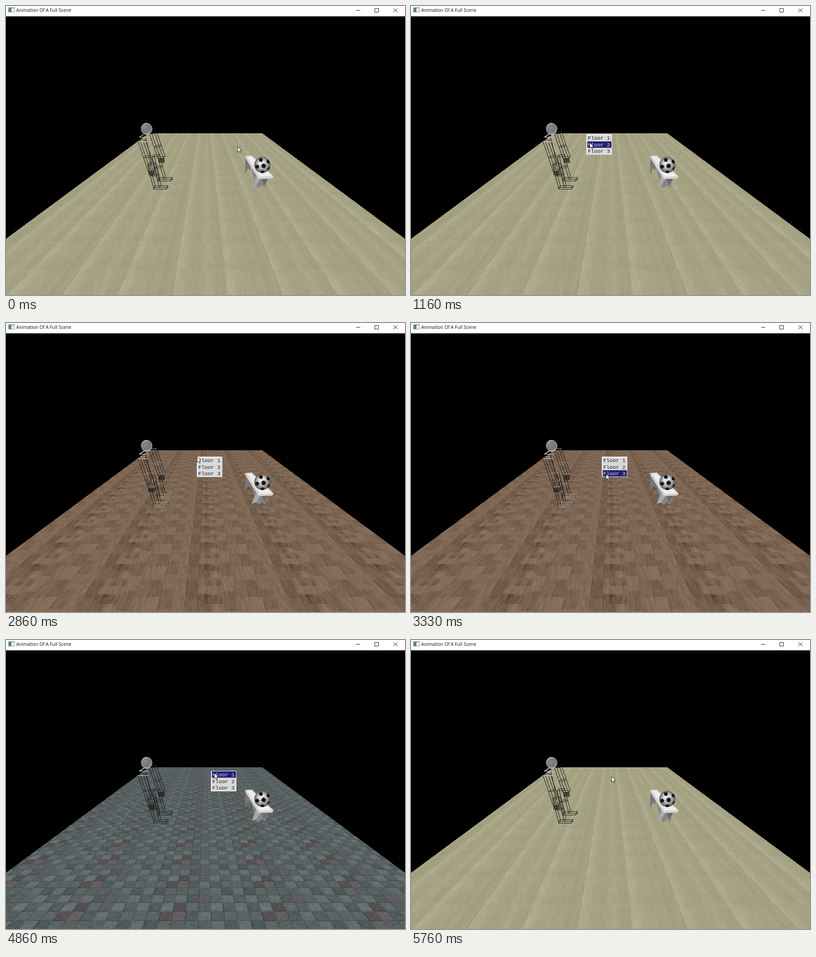
These frames come from a looping animation (878x638 px, 5.9 s). An HTML page with a canvas:

```html
<!DOCTYPE html>
<html lang="en">
<head>
<meta charset="utf-8">
<title>Animation Of A Full Scene</title>
<style>
html, body { margin: 0; width: 100%; height: 100%; overflow: hidden; background: #000; }
canvas { display: block; }
</style>
</head>
<body>
<canvas id="stage" width="878" height="638"></canvas>
<script>
const W = 878, H = 638, LOOP = 5900;
const stage = document.getElementById('stage').getContext('2d');

// ---- floor textures: a runs across, b runs along the depth ----
const frac = v => v - Math.floor(v);
const rnd = (i, j = 0) => frac(Math.sin(i * 127.1 + j * 311.7 + 17) * 43758.5453);
function noise(x, y) {
  const i = Math.floor(x), j = Math.floor(y), s = v => v * v * (3 - 2 * v);
  const p = s(x - i), q = s(y - j);
  const top = rnd(i, j) * (1 - p) + rnd(i + 1, j) * p;
  const low = rnd(i, j + 1) * (1 - p) + rnd(i + 1, j + 1) * p;
  return top * (1 - q) + low * q;
}

function planks(a, b) {
  a = frac(a - .15);
  const e = frac(a * 2), edge = Math.exp(-e * 5);
  const l = 154 + 8 * noise(a * 70, b * 5) + 12 * noise(a * 9 + 40, b * 1.6 + 3)
    + 11 * edge - (a < .5 ? 0 : 3) - 5 * noise(a * 25, b * 2 + 9);
  return [l + 3, l, l - 32 + 8 * edge];
}

function parquet(a, b) {
  const col = Math.floor(a * 8), c = (b * 2 + rnd(col, 5) * 2) % 2, row = Math.floor(c);
  let l = (rnd(col, row) - .5) * 28 + (noise(a * 90, b * 6) - .5) * 20;
  if (frac(a * 8) < .05 || frac(c) < .03) l -= 9;
  const mosaic = Math.abs(a - .52) < .09 && frac(b * 2) < .5;
  if (mosaic) l -= 6 + 22 * rnd(Math.floor(a * 32), Math.floor(b * 6));
  return [125 + l, 103 + l * .95, 84 + l * .85];
}

function stones(a, b) {
  const x = a * 8, y = b * 4, i = Math.floor(x), j = Math.floor(y);
  let l = (rnd(i, j) - .5) * 16 + ((i + j) % 2 ? 6 : -6) + (noise(a * 60, b * 30) - .5) * 16;
  if (frac(x) < .07 || frac(y) < .1) l -= 14;
  const red = rnd(i, j + 20) > .92 ? 7 : 0;
  return [90 + l + red, 100 + l - red, 101 + l - red];
}

// ---- perspective floor, painted pixel by pixel ----
const VX = 439, VY = 188.3, SLOPE = 1.348, TOP = 281, N = 256;
function paintFloor(g, shade) {
  const tex = new Float32Array(N * N * 3);
  for (let j = 0, k = 0; j < N; j++)
    for (let i = 0; i < N; i++)
      for (const c of shade(i / N, j / N)) tex[k++] = c;
  const img = g.createImageData(W, H - TOP);
  for (let y = TOP; y < H; y++) {
    for (let x = 0; x < W; x++) {
      if (Math.abs(x + .5 - VX) > SLOPE * (y + .5 - VY)) continue;
      const sum = [0, 0, 0];
      for (let s = 0; s < 8; s++) {
        const dy = y + (s % 4 + .5) / 4 - VY, dx = x + (s < 4 ? .25 : .75) - VX;
        const i = Math.floor(frac(dx / (SLOPE * dy * .4) + .45) * N);
        const j = Math.floor(frac((1 / dy - .00255) / .00047) * N);
        for (let c = 0; c < 3; c++) sum[c] += tex[(j * N + i) * 3 + c];
      }
      const o = ((y - TOP) * W + x) * 4;
      for (let c = 0; c < 3; c++) img.data[o + c] = sum[c] / 8;
      img.data[o + 3] = 255;
    }
  }
  g.putImageData(img, 0, TOP);
}

// ---- drawing helpers ----
function path(g, pts, close) {
  g.beginPath();
  for (let i = 0; i < pts.length; i += 2) g.lineTo(pts[i], pts[i + 1]);
  if (close) g.closePath();
}
function poly(g, fill, ...pts) { path(g, pts, true); g.fillStyle = fill; g.fill(); }
function line(g, color, ...pts) {
  path(g, pts.map(p => Math.round(p) + .5));
  g.strokeStyle = color; g.lineWidth = 1; g.stroke();
}
function rect(g, fill, x, y, w, h) { g.fillStyle = fill; g.fillRect(x, y, w, h); }
function disc(g, fill, r) { g.fillStyle = fill; g.beginPath(); g.arc(0, 0, r, 0, 7); g.fill(); }
function glow(g, r, dy, ...colors) {
  const grad = g.createRadialGradient(-2, dy, 1, 0, 0, r);
  colors.forEach((c, i) => grad.addColorStop(i / (colors.length - 1), c));
  return grad;
}

// Wire box leaning from (x, y) to (u, v), w wide, with its back face up and right.
function limb(g, rung, [x, y], [u, v], w) {
  for (const [p, q] of [[x, y], [u, v]])
    line(g, rung, p, q, p + w, q, p + w + 4, q - 4, p + 4, q - 4, p, q);
  for (const p of [0, w]) {
    line(g, '#111', x + p, y, u + p, v);
    line(g, '#111', x + p + 4, y - 4, u + p + 4, v - 4);
  }
}

function paintHand(g, [x, y]) {
  for (let i = 0; i < 5; i++) {
    line(g, '#0b0b0b', x + 1 + i * 3, y - 1 + i % 2, x + 2 + i * 3, y + 9 + i % 3);
    line(g, '#222', x + 1, y + i * 2, x + 14, y + i * 2 + 1);
  }
}

// One arm and one leg, then the same again further back.
function paintFigure(g, rung) {
  const arm = [[290, 299], [302, 334], [312, 364]];
  const leg = [[311, 350], [317, 375], [324, 400]];
  const farArm = arm.map(([x, y]) => [315 + (x - 290) * .85, 281 + (y - 299) * .85]);
  const farLeg = leg.map(([x, y]) => [x + 10, y - 18]);
  for (const [a, l] of [[farArm, farLeg], [arm, leg]]) {
    for (let i = 0; i < 2; i++) {
      limb(g, rung, a[i], a[i + 1], 12);
      limb(g, rung, l[i], l[i + 1], 13);
    }
    const [x, y] = l[2];
    limb(g, rung, [x, y], [x, y + 4], 28);
    paintHand(g, a[2]);
  }
  line(g, '#111', 306, 284, 320, 347);
  line(g, '#e4e4e4', 290, 299, 313, 299);
  line(g, '#ddd', 312, 289, 293, 289, 304, 282, 314, 282);

  g.save();
  g.translate(309.5, 271);
  g.rotate(-.35);
  const r = 12.2;
  disc(g, glow(g, r, -3, '#6a6a6a', '#3c3c3c'), r);
  g.strokeStyle = 'rgba(205,205,205,.6)';
  g.lineWidth = .5;
  for (let k = -5; k <= 5; k++) {
    const w = r * Math.cos(k * .28);
    g.beginPath(); g.ellipse(0, 0, w, r, 0, 0, 7); g.stroke();
    g.beginPath(); g.ellipse(0, r * Math.sin(k * .28), w, w * .2, 0, 0, 7); g.stroke();
  }
  g.restore();
}

function paintTable(g) {
  poly(g, '#777', 527, 334, 540, 346, 537, 364, 533, 358, 526, 371);
  poly(g, '#858585', 540, 358, 577, 380, 570, 401, 563, 395, 556, 402, 549, 396, 541, 399, 546, 384);
  poly(g, '#a8a8a8', 552, 372, 562, 378, 551, 396, 541, 399);
  poly(g, '#686868', 562, 380, 576, 381, 568, 396);
  poly(g, '#d2d2d2', 526, 331, 541, 330, 589, 376, 586, 381, 556, 382, 543, 362, 527, 336);
  poly(g, '#ededed', 530, 332, 540, 332, 586, 376, 558, 377);
  paintBall(g, 564, 351, 17.7);
}

// A pentagon near the middle with a ring of five more around it.
function paintBall(g, x, y, r) {
  g.save();
  g.translate(x, y);
  disc(g, glow(g, r, -6, '#f4f4f4', '#c4c4c4', '#555'), r);
  g.clip();
  const ring = (cx, cy, rad, turn, squash = 1) => Array.from({ length: 5 }, (_, k) => {
    const an = turn + k * Math.PI * .4;
    return [cx + rad * Math.cos(an), cy + rad * squash * Math.sin(an)];
  });
  const spot = (cx, cy, rad) => poly(g, '#161616', ...ring(cx, cy, rad, -1.4).flat());
  for (const [sx, sy] of ring(3, 2, 14.5, -.75)) {
    line(g, '#888', 3, 2, sx, sy);
    spot(sx, sy, 4.8);
  }
  spot(3, 2, 5.6);
  g.restore();
}

function paintTitleBar(g) {
  rect(g, '#fff', 0, 0, W, 22);
  rect(g, '#c9c9c9', 0, 22, W, 1);
  rect(g, '#8b9696', 5, 3, 14, 11);
  rect(g, '#f2f4f4', 6, 5, 12, 8);
  rect(g, '#4c8b80', 6, 5, 6, 8);
  g.fillStyle = '#111';
  g.font = '10.1px "Open Sans", "Noto Sans", sans-serif';
  g.fillText('Animation Of A Full Scene', 22.5, 13);
  line(g, '#111', 770, 9, 779, 9);
  line(g, '#111', 811, 5, 819, 5, 819, 13, 811, 13, 811, 5);
  line(g, '#111', 852, 5, 861, 13);
  line(g, '#111', 861, 5, 852, 13);
}

const scenes = [[planks, '#222'], [parquet, '#a09a94'], [stones, '#2a2a2a']].map(([shade, rung]) => {
  const c = document.createElement('canvas');
  c.width = W; c.height = H;
  const g = c.getContext('2d');
  rect(g, '#000', 0, 0, W, H);
  paintFloor(g, shade);
  paintFigure(g, rung);
  paintTable(g);
  paintTitleBar(g);
  return c;
});

// ---- timeline ----
// pointer moves: first step, last step, number of steps, x, y
const moves = [
  [30, 130, 4, 347, 293], [300, 400, 4, 386, 283], [930, 1160, 8, 393, 301],
  [2360, 2430, 3, 420, 295], [3000, 3330, 11, 429, 333], [4000, 4360, 9, 451, 289],
  [4800, 4860, 3, 458, 293], [5660, 5760, 4, 441, 301]
];
// menus: open, close, x, y
const menus = [[730, 2000, 386, 283], [2860, 3830, 420, 295], [4600, 5360, 451, 289]];

function pointerAt(t) {
  let x = 509, y = 310;
  for (const [from, to, steps, nx, ny] of moves) {
    if (t < from) break;
    const step = Math.floor((t - from) / (to - from) * (steps - 1) + 1e-6) + 1;
    const k = Math.min(1, step / steps);
    x += (nx - x) * k;
    y += (ny - y) * k;
  }
  return [Math.round(x), Math.round(y)];
}

function drawMenu(g, x, y, pointerY) {
  const active = Math.floor((pointerY - y - 1) / 14.7);
  rect(g, '#f4f4f4', x, y, 56, 45);
  rect(g, '#d9d9d9', x + 2, y + 2, 53, 42);
  g.font = '11.67px "Liberation Mono", "DejaVu Sans Mono", monospace';
  for (let i = 0; i < 3; i++) {
    const top = y + 1 + Math.round(i * 14.6);
    if (i === active) rect(g, '#1f2172', x + 2, top, 53, 14);
    g.fillStyle = i === active ? '#dcdce8' : '#1a1a1a';
    g.fillText('Floor ' + (i + 1), x + 3, top + 11);
  }
}

function drawPointer(g, x, y) {
  g.save();
  g.translate(x + .5, y + .5);
  path(g, [0, 0, 0, 12, 3, 9.5, 5, 14, 7, 13, 5, 8.8, 8.5, 8.5], true);
  g.fillStyle = '#fff'; g.fill();
  g.strokeStyle = '#111'; g.lineWidth = .9; g.stroke();
  g.restore();
}

const start = performance.now();
function draw() {
  const t = (performance.now() - start) % LOOP;
  const floor = t < 2000 || t >= 5360 ? 0 : t < 3830 ? 1 : 2;
  const [x, y] = pointerAt(t);
  stage.drawImage(scenes[floor], 0, 0);
  for (const [open, close, mx, my] of menus)
    if (t >= open && t < close) drawMenu(stage, mx, my, y);
  drawPointer(stage, x, y);
  requestAnimationFrame(draw);
}
draw();
</script>
</body>
</html>
```
